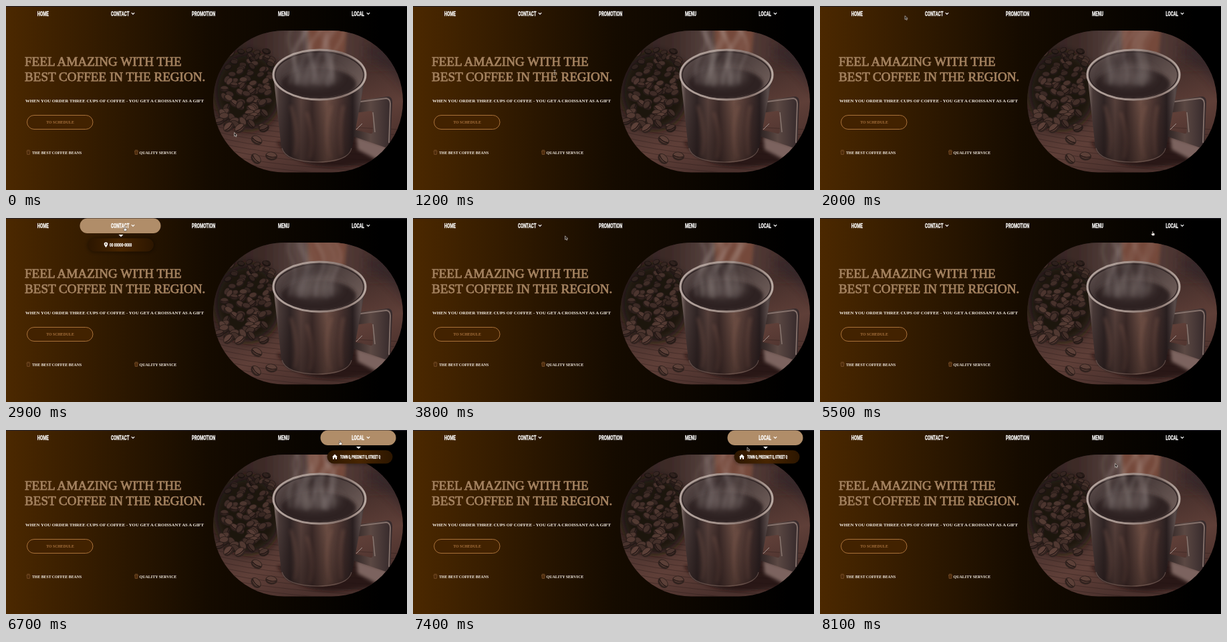
These frames come from a looping animation (600x277 px, 8.2 s). An HTML page:

```html
<!DOCTYPE html>
<html lang="en">
<head>
<meta charset="utf-8">
<title>Coffee landing page</title>
<style>
  html, body { margin: 0; width: 100%; height: 100%; overflow: hidden; background: #000; }
  svg { display: block; width: 100%; height: 100%; }
  .serif { font-family: "Liberation Serif", "Noto Serif", serif; }
  .bold { font-weight: 700; fill: #f6efe8; }
  .title { font-size: 19.1px; fill: #a58361; stroke: #a58361; stroke-width: .75; }
  .nav { font-family: Roboto, "Liberation Sans", sans-serif; font-weight: 700; fill: #fff; stroke: #fff; stroke-width: .3; }
</style>
</head>
<body>
<svg viewBox="0 0 600 277" preserveAspectRatio="none">
  <defs>
    <linearGradient id="page" gradientUnits="userSpaceOnUse" x1="0" x2="560" y1="0" y2="0">
      <stop offset="0" stop-color="#4b2800"/><stop offset=".54" stop-color="#150b00"/>
      <stop offset="1" stop-color="#000"/>
    </linearGradient>
    <linearGradient id="drop" x2="1">
      <stop offset="0" stop-color="#2c1600"/><stop offset=".5" stop-color="#482500"/><stop offset="1" stop-color="#2c1600"/>
    </linearGradient>
    <linearGradient id="table" x2=".45" y2="1">
      <stop offset="0" stop-color="#241918"/><stop offset=".45" stop-color="#3f2b28"/>
      <stop offset=".78" stop-color="#5f3f38"/><stop offset="1" stop-color="#4b312d"/>
    </linearGradient>
    <linearGradient id="wall" x2="1">
      <stop offset="0" stop-color="#2a1d1c"/><stop offset=".3" stop-color="#3f2c29"/>
      <stop offset=".5" stop-color="#5a4642"/><stop offset=".75" stop-color="#4d3531"/><stop offset="1" stop-color="#2c1f1f"/>
    </linearGradient>
    <linearGradient id="metal" x2="1">
      <stop offset="0" stop-color="#8a7872"/><stop offset=".06" stop-color="#493a38"/>
      <stop offset=".18" stop-color="#2f2424"/><stop offset=".3" stop-color="#553f3a"/>
      <stop offset=".42" stop-color="#3a2927"/><stop offset=".58" stop-color="#6c4e44"/>
      <stop offset=".72" stop-color="#4a3430"/><stop offset=".86" stop-color="#291f20"/>
      <stop offset=".95" stop-color="#5a4c4a"/><stop offset="1" stop-color="#322728"/>
    </linearGradient>
    <linearGradient id="inside" x2="1" y2=".5">
      <stop offset="0" stop-color="#6b5b58"/><stop offset=".4" stop-color="#3b2f2f"/><stop offset="1" stop-color="#6a5955"/>
    </linearGradient>
    <linearGradient id="rim" x2="1">
      <stop offset="0" stop-color="#b3a49e"/><stop offset=".4" stop-color="#a3928b"/>
      <stop offset=".75" stop-color="#836f69"/><stop offset="1" stop-color="#b8a9a2"/>
    </linearGradient>
    <linearGradient id="grip" x2="1">
      <stop offset="0" stop-color="#2c2222"/><stop offset=".45" stop-color="#5b4843"/><stop offset="1" stop-color="#34282a"/>
    </linearGradient>
    <linearGradient id="shade" x2="0" y2="1">
      <stop offset=".3" stop-color="#160c0c" stop-opacity="0"/><stop offset="1" stop-color="#160c0c" stop-opacity=".4"/>
    </linearGradient>
    <filter id="soft" x="-50%" y="-50%" width="200%" height="200%"><feGaussianBlur stdDeviation="2.6"/></filter>
    <filter id="haze" x="-50%" y="-50%" width="200%" height="200%"><feGaussianBlur stdDeviation="7"/></filter>
    <filter id="blur"><feGaussianBlur stdDeviation=".7"/></filter>
    <clipPath id="frame"><rect x="310" y="37" width="284" height="213.5" rx="106.7"/></clipPath>
    <clipPath id="mouth"><ellipse cx="469" cy="103" rx="66" ry="35"/></clipPath>
    <path id="cup" d="M400 104L412 213Q416 235 466 236Q514 235 518 213L538 104Z"/>
  </defs>

  <rect width="600" height="277" fill="url(#page)"/>
  <rect width="600" height="1" fill="#22202a"/>

  <g clip-path="url(#frame)">
    <rect x="310" y="37" width="284" height="214" fill="url(#table)"/>
    <rect x="300" y="27" width="304" height="62" fill="url(#wall)" filter="url(#haze)"/>
    <path d="M451 30H511L506 80H453Z" fill="#74493a" filter="url(#soft)"/>
    <path d="M540 75Q575 90 600 130V60H540Z" fill="#35262a" opacity=".7" filter="url(#haze)"/>
    <g id="grain" fill="none" stroke="#2e1d1c" stroke-opacity=".45" filter="url(#blur)"/>
    <ellipse cx="362" cy="128" rx="50" ry="58" fill="#1c1211" filter="url(#haze)"/>
    <g id="beans" filter="url(#blur)"/>
    <path d="M405 205Q440 252 520 240L560 236L530 190Z" fill="#1a1010" opacity=".7" filter="url(#soft)"/>
    <path d="M524 196L576 214L560 234L526 216Z" fill="#7b645e" filter="url(#soft)"/>

    <path d="M520 143L572 136Q578 137 578 145L575 209Q574 215 568 213L519 196V186L546 192Q549 192 549 188V163Q549 158 545 158L521 161Z" fill="url(#grip)"/>
    <path d="M522 145L569 139Q575 140 575 147L573 206" fill="none" stroke="#85726c" stroke-width="1.8"/>
    <path d="M549 160L552 190" fill="none" stroke="#8b7972" stroke-width="1.4"/>

    <use href="#cup" fill="url(#metal)"/>
    <g fill="none" stroke="#8d6354" stroke-width="4" opacity=".4" filter="url(#soft)">
      <path d="M426 150Q440 195 432 226M450 160Q462 195 455 230M487 150Q474 190 486 230M505 150Q498 180 502 225"/>
    </g>
    <use href="#cup" fill="url(#shade)"/>
    <path d="M524 186L533 177" stroke="#a39590"/>
    <path d="M413 214Q418 234 466 235Q513 234 517 214" fill="none" stroke="#80685f" stroke-width="1.2" opacity=".6"/>

    <ellipse cx="469" cy="103.5" rx="69" ry="37.5" fill="url(#inside)" stroke="url(#rim)" stroke-width="3"/>
    <ellipse cx="469" cy="104" rx="66" ry="34.5" fill="none" stroke="#2e2323" stroke-width="1.2"/>
    <g clip-path="url(#mouth)">
      <ellipse cx="468" cy="118" rx="56" ry="24" fill="#2d2222" filter="url(#soft)"/>
      <ellipse cx="462" cy="105" rx="38" ry="15" fill="#9a8c89" opacity=".35" filter="url(#haze)"/>
    </g>
    <g id="steam" fill="none" stroke="#cbbfbc" stroke-linecap="round" filter="url(#soft)"/>
  </g>

  <g class="serif">
    <text class="title" x="28" y="89.6">FEEL AMAZING WITH THE</text>
    <text class="title" x="28" y="113">BEST COFFEE IN THE REGION.</text>
    <text class="bold" x="29" y="145.3" font-size="6.8">WHEN YOU ORDER THREE CUPS OF COFFEE - YOU GET A CROISSANT AS A GIFT</text>
    <rect x="31.5" y="164.5" width="98.5" height="21" rx="10.5" fill="#422200" stroke="#a9713a"/>
    <text x="81" y="177" font-size="5.8" font-weight="700" text-anchor="middle" fill="#a9733f">TO SCHEDULE</text>
    <text class="bold" x="39" y="223" font-size="5.8">THE BEST COFFEE BEANS</text>
    <text class="bold" x="199.5" y="223" font-size="6">QUALITY SERVICE</text>
  </g>
  <g id="icons" fill="#4d2b0b" stroke="#80542c" stroke-width=".7"/>

  <g id="menus"></g>
  <g id="links"></g>
  <g id="cursor">
    <path d="M0 0V5.6L1.4 4.4L2.4 6.5L3.4 6L2.4 4H4.2Z" fill="#1b1512" stroke="#e8e2dd" stroke-width=".6"/>
    <path d="M-1.5 -3.5Q0 -3.5 0 -2.5Q0 -3.5 1.5 -3.5M0 -2.5V2.5M-1.5 3.5Q0 3.5 0 2.5Q0 3.5 1.5 3.5" fill="none" stroke="#d8d2cc" stroke-width=".7"/>
    <path d="M-.8 -2.8Q0 -3.4 .5 -2.6V-.3L2.4 .2Q3 .5 2.8 1.4L2.2 3.6H-1L-2.6 1Q-2.4 0 -.8 1Z" fill="#fff" stroke="#2a1c10" stroke-width=".5"/>
  </g>
</svg>
<script>
const LOOP = 8200, STEP = 100, CONDENSE = .64;
const $ = id => document.getElementById(id);

function add(parent, tag, attrs, text) {
  const el = document.createElementNS("http://www.w3.org/2000/svg", tag);
  for (const k in attrs) el.setAttribute(k, attrs[k]);
  if (text) el.textContent = text;
  parent.appendChild(el);
  return el;
}

function label(parent, text, x, y, size, anchor) {
  add(parent, "text", {
    class: "nav", "font-size": size, "text-anchor": anchor,
    transform: `translate(${x} ${y}) scale(${CONDENSE} 1)`
  }, text);
}

let seed = 11;
const rand = () => (seed = (seed * 16807) % 2147483647) / 2147483647;

// Coffee beans: dark body, lit upper side, a crease on some
function bean(x, y, r, tone, crease) {
  const g = add($("beans"), "g", { transform: `translate(${x} ${y}) rotate(${rand() * 120 - 60})` });
  add(g, "ellipse", { rx: r, ry: r * .72, fill: `hsl(14 24% ${tone * .55}%)` });
  add(g, "ellipse", { cy: -r * .12, rx: r * .82, ry: r * .5, fill: `hsl(14 24% ${tone}%)` });
  if (crease) add(g, "path", {
    d: `M${-r * .8} 0Q0 ${r * .35} ${r * .8} 0`, fill: "none", stroke: "#1d1211", "stroke-width": 1.1
  });
}
for (let i = 0; i < 95; i++) {
  const k = i / 94, y = 62 + k * 118;
  const left = 338 - 22 * k, right = 402 - 14 * k * k;
  bean(left + rand() * (right - left), y + rand() * 6, 5.5 + k * 2.5, 13 + k * 8 + rand() * 8, rand() < k * .6);
}
[[375, 202], [374, 230], [397, 226], [333, 182], [350, 184]].forEach(([x, y]) => bean(x, y, 9, 29, true));

for (let i = 0; i < 12; i++) {
  const y = 168 + i * 8;
  add($("grain"), "path", { d: `M310 ${y - 12}Q400 ${y + 12} 594 ${y + 18}` });
}

[31, 192.5].forEach(x => add($("icons"), "path", {
  d: `M${x} 218H${x + 5}L${x + 4.3} 223.5H${x + .7}ZM${x + .5} 217H${x + 4.5}`
}));

// Navigation bar
[["HOME", 55.3], ["CONTACT", 170.7], ["PROMOTION", 295.7], ["MENU", 415.5], ["LOCAL", 526.7]]
  .forEach(([text, x]) => label($("links"), text, x, 15, 9.5, "middle"));
[190, 542].forEach(x => add($("links"), "path", {
  d: `M${x - 2.2} 10.2L${x} 12.4L${x + 2.2} 10.2`, fill: "none", stroke: "#fff", "stroke-width": 1.2
}));

function menu(m) {
  const g = add($("menus"), "g", { opacity: 0 });
  add(g, "rect", { x: m.x, y: .5, width: m.w, height: 22.5, rx: 11.2, fill: "#b08d69" });
  add(g, "path", { d: `M${m.tip - 3.5} 25H${m.tip + 3.5}L${m.tip} 28.5Z`, fill: "#fff" });
  add(g, "rect", { x: m.boxX - 1, y: 30, width: 100, height: 22, rx: 11, fill: "#000", opacity: .35, filter: "url(#soft)" });
  add(g, "rect", { x: m.boxX, y: 30.5, width: 98, height: 20, rx: 10, fill: "url(#drop)" });
  add(g, "path", { d: m.icon, fill: "#fff", "fill-rule": "evenodd" });
  label(g, m.text, m.textX, 43.2, m.size, "start");
  return g;
}

const menus = [
  { x: 110.5, w: 121, tip: 172, boxX: 123, text: "00 00000-0000", textX: 155, size: 7.5, from: 2000, to: 3700,
    icon: "M149.5 44.5Q146.7 41 146.7 39.3A2.8 2.8 0 0 1 152.3 39.3Q152.3 41 149.5 44.5ZM148.5 39.3a1 1 0 0 0 2 0a1 1 0 0 0 -2 0Z" },
  { x: 470.5, w: 113, tip: 527.5, boxX: 480.5, text: "TOWN Q, PRECINCT Q, STREET Q", textX: 500, size: 6.3, from: 5500, to: 7500,
    icon: "M492 36.5L496 40.4H495V44H493V41.5H491V44H489V40.4H488Z" }
];
menus.forEach(m => m.el = menu(m));

// Pointer stops: time, x, y, shape (0 arrow, 1 text, 2 hand)
const stops = [
  [0, 341.5, 190.5, 0], [500, 47, 9, 2], [700, 80, 50, 0], [1000, 185, 95, 1],
  [1200, 212, 100, 1], [1500, 160, 60, 0], [1800, 90, 14, 0], [2100, 140, 15, 2],
  [2900, 178, 16, 2], [3300, 172, 40, 2], [3600, 212, 31, 0], [3800, 227.5, 27, 0],
  [4500, 290, 60, 0], [5000, 400, 48, 0], [5400, 490, 28, 2], [5500, 498, 23, 2],
  [6000, 512, 15, 2], [6700, 500, 19, 2], [7100, 525, 39, 2], [7400, 500, 26, 0],
  [8100, 441.5, 50.5, 0]
];
const shapes = [...$("cursor").children];

function moveCursor(t) {
  let i = 0;
  while (i < stops.length - 2 && stops[i + 1][0] <= t) i++;
  const a = stops[i], b = stops[i + 1];
  const k = Math.min(1, (t - a[0]) / (b[0] - a[0])), e = k * k * (3 - 2 * k);
  const x = a[1] + (b[1] - a[1]) * e, y = a[2] + (b[2] - a[2]) * e;
  const shape = k < 1 ? a[3] : b[3];
  $("cursor").setAttribute("transform", `translate(${x} ${y})`);
  shapes.forEach((s, n) => s.setAttribute("visibility", n === shape ? "visible" : "hidden"));
}

const wisps = Array.from({ length: 9 }, (_, i) => ({
  el: add($("steam"), "path", { "stroke-width": 4 + i % 4 * 2 }),
  x: 425 + i * 8, phase: i * 1.9, turns: 3 + i % 3
}));

function drawSteam(t) {
  const turn = t / LOOP * Math.PI * 2;
  for (const w of wisps) {
    let d = "";
    for (let s = 0; s <= 12; s++) {
      const y = 116 - s * 7;
      const sway = Math.sin(s * .5 + w.phase - turn * w.turns) * (1.5 + s * .75);
      d += `${s ? "L" : "M"}${(w.x + sway + s * .6).toFixed(1)} ${y.toFixed(1)}`;
    }
    w.el.setAttribute("d", d);
    w.el.setAttribute("stroke-opacity", .13 + .06 * Math.sin(turn * w.turns + w.phase));
  }
}

function draw(now) {
  const t = Math.floor((now % LOOP) / STEP) * STEP;
  for (const m of menus) {
    const shown = t < m.to ? Math.max(0, Math.min(1, (t - m.from) / 200)) : 0;
    m.el.setAttribute("opacity", shown);
  }
  drawSteam(t);
  moveCursor(t);
}

const start = performance.now();
function tick() {
  draw(performance.now() - start);
  requestAnimationFrame(tick);
}
tick();
</script>
</body>
</html>
```
